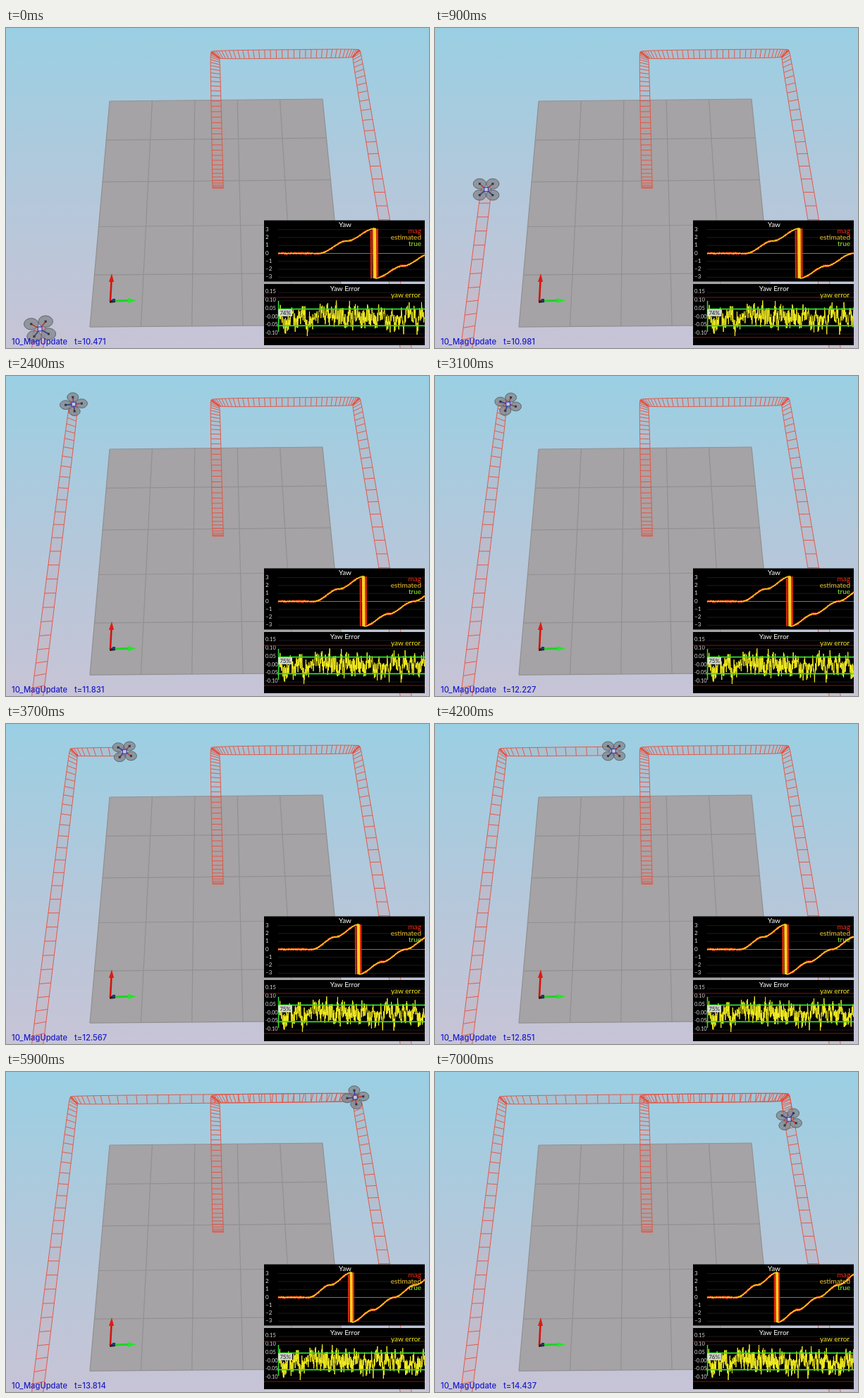
Recreate the animation shown at these times as an HTML page with a canvas. Size 600x455 px, loop 7100 ms.

```html
<!DOCTYPE html>
<html lang="en">
<head>
<meta charset="utf-8">
<title>Quadrotor yaw estimate</title>
<style>
html, body { margin: 0; width: 100%; height: 100%; overflow: hidden; }
canvas { display: block; }
</style>
</head>
<body>
<canvas id="stage" width="600" height="455"></canvas>
<script>
const ctx = document.getElementById('stage').getContext('2d');
const LOOP = 7100, STEP = 100;
const START = 10.471, RATE = 3.966 / 7000;      // simulation seconds
const DT = 0.02, RUNG = 0.05;
const TAKEOFF = 1.93, LEG = 2.03, MOVE = 1.8;   // each leg moves, then rests
const TURN_START = 2.92, TURN = 2;
const FAR = 0.255;                              // depth of the flown square

const clamp = x => Math.min(1, Math.max(0, x));
const ease = x => (x = clamp(x)) * x * (3 - 2 * x);
const mix = (a, b, p) => a + (b - a) * p;
const random = (i, seed) => {
  const v = Math.sin(i * 12.9898 + seed * 78.233) * 43758.5453;
  return (v - Math.floor(v)) * 2 - 1;
};

// Perspective view of a horizontal plane; v grows toward the viewer.
const plane = (cx, skew, unit, top, depth, tilt) => (u, v) => {
  const s = 1 / (1 - v), dy = depth * (s - 1);
  return { x: cx + skew * dy + unit * u * s, y: top + dy - tilt * u, s };
};
const ground = plane(298, .006, 60.4, 102.5, 1619, .6);
const sky = plane(296.5, .022, 200.5, 38, 1378, 2);

// Take off from the middle, then fly round the square.
const waypoints = [[0, .121], [0, 0], [1, 0], [1, FAR], [-1, FAR], [-1, 0], [1, 0], [1, FAR]];
function position(s) {
  const leg = Math.max(0, Math.floor((s - TAKEOFF) / LEG));
  const p = ease((s - TAKEOFF - leg * LEG) / MOVE);
  const [a, b] = [waypoints[leg], waypoints[leg + 1]];
  return sky(mix(a[0], b[0], p), mix(a[1], b[1], p));
}
function heading(s) {
  const turns = Math.max(0, (s - TURN_START) / TURN), done = Math.floor(turns);
  return Math.PI / 2 * (done + ease(turns - done));
}

const wrap = a => a - 2 * Math.PI * Math.floor((a + Math.PI) / (2 * Math.PI));
const bump = (s, at) => Math.exp(-(((s - at) / .03) ** 2));
const truth = [], estimate = [], mag = [], error = [];
for (let i = 0; i * DT < START + RATE * LOOP; i++) {
  const s = i * DT, yaw = heading(s), k = Math.floor(i / 8);
  const drift = mix(random(k, 4), random(k + 1, 4), i / 8 - k);
  truth.push(wrap(yaw));
  estimate.push(wrap(yaw + .03 * random(i, 1)));
  mag.push(wrap(yaw + .2 * random(i, 2)));
  error.push(.06 * drift + .052 * random(i, 3) + .1 * bump(s, 5.27) - .06 * bump(s, 2.1));
}

function line(color, width, ...pts) {
  ctx.strokeStyle = color;
  ctx.lineWidth = width;
  ctx.beginPath();
  pts.forEach(p => ctx.lineTo(...p));
  ctx.stroke();
}
function fill(color, ...pts) {
  ctx.fillStyle = color;
  ctx.beginPath();
  pts.forEach(p => ctx.lineTo(...p));
  ctx.fill();
}
function rect(color, x, y, w, h) {
  ctx.fillStyle = color;
  ctx.fillRect(x, y, w, h);
}
function text(str, x, y, color, font, align = 'left') {
  ctx.font = font;
  ctx.textAlign = align;
  ctx.fillStyle = color;
  ctx.fillText(str, x, y);
}

function drawGround() {
  const air = ctx.createLinearGradient(0, 0, 0, 455);
  ['#9acfe3', '#b3c8db', '#c7c4d6'].forEach((c, i) => air.addColorStop(i / 2, c));
  rect(air, 0, 0, 600, 455);
  const at = (u, row) => {
    const p = ground(u, row * .0331);
    return [p.x, p.y];
  };
  fill('#a5a3a5', at(-2.5, 0), at(2.5, 0), at(2.5, 5), at(-2.5, 5));
  for (let i = 0; i <= 5; i++) {
    line('#919092', 1.2, at(i - 2.5, 0), at(i - 2.5, 5));
    line('#919092', 1.2, at(-2.5, i), at(2.5, i));
  }
  line('#222', 4, [147, 389], [155, 388]);
  line('#d3140f', 2.6, [148, 388], [149.5, 360]);
  fill('#e01a12', [150, 349], [153, 361], [146, 361]);
  line('#1fd02a', 3, [155, 388], [175, 387.5]);
  fill('#22e52c', [185, 387.5], [173, 384], [173, 391]);
  rect('#26357a', 151, 385, 4, 4);
}

// Each rung lies across the drone as it was at that moment.
function drawTrail(now) {
  const left = [], right = [];
  const add = s => {
    const p = position(s), a = heading(s);
    const dx = 6.7 * p.s * Math.cos(a), dy = 6.2 * p.s * Math.sin(a);
    left.push([p.x - dx, p.y - dy]);
    right.push([p.x + dx, p.y + dy]);
  };
  for (let s = TAKEOFF; s < now; s += RUNG) add(s);
  add(now);
  fill('rgba(200,150,155,.2)', ...left, ...right.slice().reverse());
  const red = 'rgba(234,76,56,.88)';
  line(red, 1, ...left);
  line(red, 1, ...right);
  left.forEach((p, i) => line(red, 1, p, right[i]));
}

function drawDrone(now) {
  const { x, y, s } = position(now);
  const rotors = [0, 1, 2, 3].map(k => {
    const a = heading(now) + (k - 1.5) * Math.PI / 2 - Math.PI / 2 + Math.PI / 2 * 1;
    const b = a - Math.PI / 2 + Math.PI / 2 * 0;
    return { x: x + 11.5 * s * Math.cos(b), y: y + 10 * s * Math.sin(b), front: k === 1 || k === 2 };
  });
  for (const r of rotors) {
    ctx.beginPath();
    ctx.ellipse(r.x, r.y, 8 * s, 6.4 * s, 0, 0, 7);
    ctx.fillStyle = 'rgba(132,138,144,.8)';
    ctx.fill();
    ctx.strokeStyle = 'rgba(80,86,92,.8)';
    ctx.lineWidth = 1;
    ctx.stroke();
  }
  for (const r of rotors) {
    line(r.front ? '#c2352f' : '#34408f', 1.6, [x, y], [r.x, r.y]);
    rect('#33363f', r.x - 1.5, r.y - 1.5, 3, 3);
  }
  rect('#3d3fae', x - 3.5, y - 3.5, 7, 7);
  rect('#c5c5dc', x - 2.3, y - 2.3, 4.6, 4.6);
}

// The whole history always spans the full plot width.
function plot(values, now, color, width, toY) {
  const pts = values.slice(0, Math.floor(now / DT) + 1)
    .map((v, i) => [386 + 208 * i * DT / now, toY(v)]);
  line(color, width, ...pts);
}

function drawCharts(now) {
  const label = '10px Lato, sans-serif', yellow = '#f4ee20', green = '#30e030';
  rect('#000', 366, 273.5, 228, 87);
  rect('#000', 366, 364, 228, 87);

  const yawY = v => 320.5 - 11.3 * v;
  for (let v = -3; v <= 3; v++) {
    line(v ? '#1c1c1c' : '#777', 1, [386, yawY(v)], [594, yawY(v)]);
    text(String(v).replace('-', '−'), 368, yawY(v) + 2, '#ddd', '8px Lato, sans-serif');
  }
  plot(mag, now, '#e02a10', 1, yawY);
  plot(truth, now, '#8fe020', 1, yawY);
  plot(estimate, now, '#ffd020', 1.3, yawY);
  text('Yaw', 481, 282.5, '#fff', label, 'center');
  text('mag', 589, 291.5, '#f03018', label, 'right');
  text('estimated', 589, 300.5, '#f0c030', label, 'right');
  text('true', 589, 309.5, '#90f030', label, 'right');

  const errorY = v => 411.5 - 236 * v;
  for (let i = 3; i >= -2; i--) {
    const y = errorY(i * .05);
    line('#1c1c1c', 1, [386, y], [594, y]);
    text((i ? '' : '-') + (i * .05).toFixed(2), 368, y + 1, '#ddd', '7.5px Lato, sans-serif');
  }
  for (const y of [383, 440]) line('#8c1010', 1, [366, y], [594, y]);
  plot(error, now, yellow, 1, errorY);
  line(green, 1.5, [386.5, 388], [386.5, 432]);
  for (const v of [.05, -.05]) line(green, 1.8, [386, errorY(v)], [594, errorY(v)]);
  const seen = error.slice(0, Math.floor(now / DT));
  const inside = seen.filter(e => Math.abs(e) < .05).length / seen.length;
  rect('rgba(215,225,215,.9)', 386, 400, 20, 10);
  text(Math.round(inside * 100) + '%', 396, 408, '#222', '8px Lato, sans-serif', 'center');
  text('Yaw Error', 481, 373.5, '#fff', label, 'center');
  text('yaw error', 588, 382.5, yellow, label, 'right');
}

const origin = performance.now();
function frame() {
  const t = Math.floor((performance.now() - origin) % LOOP / STEP) * STEP;
  const now = START + RATE * t, font = '500 11.2px Inter, sans-serif';
  drawGround();
  drawTrail(now);
  drawDrone(now);
  drawCharts(now);
  text('10_MagUpdate', 8, 449.5, '#1c1cc8', font);
  text('t=' + now.toFixed(3), 97, 449.5, '#1c1cc8', font);
  requestAnimationFrame(frame);
}
frame();
</script>
</body>
</html>
```
